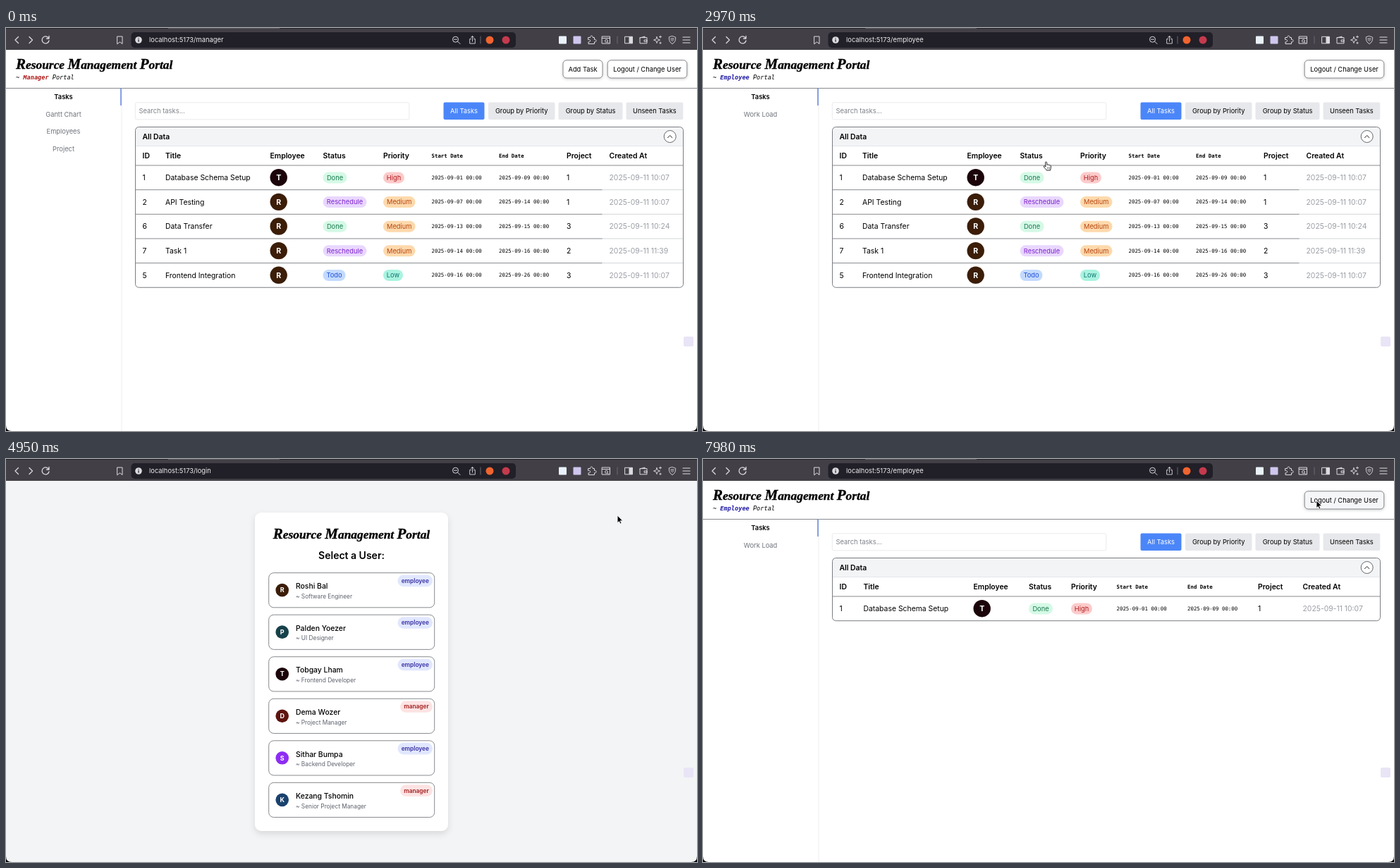
An HTML page for the animation above (8000 ms loop, 980x572 px).

```html
<!DOCTYPE html>
<html lang="en">
<head>
<meta charset="utf-8">
<title>Resource Management Portal</title>
<style>
  html, body { margin: 0; width: 100%; height: 100%; overflow: hidden; background: #fff; }
  svg { display: block; }
  text { font-family: Inter, sans-serif; white-space: pre; }
  .mono { font-family: "DejaVu Sans Mono", monospace; }
  .brand { font-family: "Liberation Serif", serif; font-weight: 700; font-style: italic; stroke: #000; stroke-width: .35; }
  .raised { filter: drop-shadow(0 1px 2px #0003); }
  .panel { filter: drop-shadow(0 4px 5px #0000001c); }
</style>
</head>
<body>
<svg id="stage" width="980" height="572" viewBox="0 0 980 572"></svg>
<script>
const LOOP = 8000;
const LINE = '#7b7d82';

// Drawing helpers: text is placed by its vertical centre.
const text = (x, y, s, size = 9.3, attrs = '') =>
  `<text x="${x}" y="${y + size * .36}" font-size="${size}" ${attrs}>${s}</text>`;
const rect = (x, y, w, h, fill, attrs = '') =>
  `<rect x="${x}" y="${y}" width="${w}" height="${h}" fill="${fill}" ${attrs}/>`;
const circle = (x, y, r, fill, attrs = '') =>
  `<circle cx="${x}" cy="${y}" r="${r}" fill="${fill}" ${attrs}/>`;
const stroke = (d, colour, width = 1) =>
  `<path d="${d}" fill="none" stroke="${colour}" stroke-width="${width}" stroke-linecap="round" stroke-linejoin="round"/>`;
const MIDDLE = 'text-anchor="middle"';
const BOLD = 'font-weight="600"';

const avatarColours = { R: '#3b1d08', P: '#17414a', T: '#1b050a', D: '#5e130e', S: '#8d2df3', K: '#1a426e' };
const avatar = (x, y, r, letter) => circle(x, y, r, avatarColours[letter]) +
  text(x, y, letter, r > 10 ? 10.6 : 9, `${MIDDLE} font-weight="700" fill="#fff"`);

const brand = (x, y, attrs = '') => {
  const words = 'Resource Management Portal'.replace(/[A-Z]/g, c => `<tspan font-size="21">${c}</tspan>`);
  return text(x, y, words, 17.4, `class="brand" ${attrs}`);
};

const pills = {
  Done: [34, '#d5f9e6', '#18794e'], Reschedule: [62, '#e9d7fe', '#7e22ce'], Todo: [32, '#c3dafe', '#1d4ed8'],
  High: [30, '#fccbcb', '#b01c1c'], Medium: [45.5, '#fdd9ac', '#b8440f'], Low: [28, '#a9f3e0', '#0f766e']
};
const pill = (x, y, label) => {
  const [w, back, ink] = pills[label];
  return rect(x, y - 8, w, 16, back, 'rx="8"') + text(x + w / 2, y, label, 9.3, `${MIDDLE} fill="${ink}"`);
};

const tasks = [
  [1, 'Database Schema Setup', 'T', 'Done', 'High', '01', '09', 1, '10:07'],
  [2, 'API Testing', 'R', 'Reschedule', 'Medium', '07', '14', 1, '10:07'],
  [6, 'Data Transfer', 'R', 'Done', 'Medium', '13', '15', 3, '10:24'],
  [7, 'Task 1', 'R', 'Reschedule', 'Medium', '14', '16', 2, '11:39'],
  [5, 'Frontend Integration', 'R', 'Todo', 'Low', '16', '26', 3, '10:07']
];
const heads = ['ID', 'Title', 'Employee', 'Status', 'Priority', 'Start Date', 'End Date', 'Project', 'Created At'];
const columns = {
  all: [193.5, 226, 374.5, 449.5, 535, 603.5, 699, 795, 855.5],
  R: [193.5, 227, 357, 434, 522, 593, 691, 790, 852],
  T: [193.5, 227.5, 383.5, 462, 522, 586.5, 687, 787, 850.5]
};

function table(owner) {
  const cols = columns[owner];
  const rows = tasks.filter(task => owner === 'all' || task[2] === owner);
  const pitch = 34.65, bottom = 195 + rows.length * pitch;
  let out = rect(183.5, 140.5, 777, 27, '#f3f4f6', 'rx="5"') + rect(184, 160, 776, 7, '#f3f4f6') +
    stroke('M184 167.5H960', '#dfe1e5', .8) +
    text(193.5, 154, 'All Data', 10.4, BOLD) +
    circle(941.7, 154, 8.5, '#fff', 'stroke="#55585d" stroke-width=".9"') + stroke('M938.5 155.7l3.2-3.2 3.2 3.2', '#222');
  heads.forEach((head, i) => {
    const small = i === 5 || i === 6;
    out += text(cols[i], 181.3, head, small ? 7.4 : 10.4, small ? 'class="mono" font-weight="700"' : BOLD);
  });
  out += stroke('M184 195H960', LINE, .9);
  rows.forEach(([id, title, letter, status, priority, start, end, project, time], i) => {
    const y = 212.4 + i * pitch;
    const date = (col, day) => text(col, y - .4, `2025-09-${day} 00:00`, 7.4, 'class="mono"');
    out += text(cols[0], y, id, 10.4) + text(cols[1], y, title, 10.4) + avatar(cols[2] + 12.2, y - .2, 12.2, letter) +
      pill(cols[3], y, status) + pill(cols[4], y, priority) + date(cols[5], start) + date(cols[6], end) +
      text(cols[7], y, project, 10.4) + text(cols[8], y, `2025-09-11 ${time}`, 10.4, 'fill="#9b9ea5"');
    if (i < rows.length - 1) {
      const line = 195 + (i + 1) * pitch, split = cols[8] - 10;
      out += stroke(`M184 ${line}H${split}`, LINE, .9) + stroke(`M${split} ${line}H960`, '#cfd1d4', .9);
    }
  });
  return out + rect(183.5, 140.5, 777, bottom - 140.5, 'none', `rx="5" stroke="${LINE}"`);
}

const url = path => text(203, 17, `localhost:5173/${path}`, 9.4, 'fill="#ededf0"');
const button = (x, w, label, name) =>
  rect(x, 45.8, w, 25.2, '#fff', `rx="5" class="raised ${name}" stroke="${LINE}" stroke-width=".9"`) +
  text(x + w / 2, 58.4, label, 9.3, MIDDLE);

function portal(role, owner) {
  const manager = role === 'Manager';
  const links = manager ? ['Tasks', 'Gantt Chart', 'Employees', 'Project'] : ['Tasks', 'Work Load'];
  const filters = [[620.5, 58, 'All Tasks'], [684, 94.5, 'Group by Priority'], [783.5, 91, 'Group by Status'], [879.5, 80.8, 'Unseen Tasks']];
  const roleText = `~ <tspan font-weight="700" fill="${manager ? '#b01919' : '#211ba6'}">${role}</tspan> Portal`;
  return url(role.toLowerCase()) + brand(14, 51.5) +
    text(14, 70.3, roleText, 8.6, 'class="mono" font-style="italic"') +
    (manager ? button(790, 56, 'Add Task', '') : '') + button(853.2, 112.6, 'Logout / Change User', 'logout') +
    stroke('M0 85.5H980', LINE, .9) + stroke('M164 86V572', '#efeff1') + stroke('M163 86V109.5', '#4a6fd8', 1.3) +
    links.map((link, i) => text(81.5, 98 + i * 24.5, link, 9.3, MIDDLE + (i ? ' fill="#6f737b"' : ` ${BOLD}`))).join('') +
    rect(183.3, 105.8, 388.5, 24, '#fff', 'rx="2" stroke="#e8e9ec" stroke-width=".9"') +
    text(188.5, 118, 'Search tasks...', 9.4, 'fill="#7d8088"') +
    filters.map(([x, w, label], i) => rect(x, 105.5, w, 24.4, i ? '#e7e8eb' : '#4b86f9', 'rx="2"') +
      text(x + w / 2, 118, label, 9.3, MIDDLE + (i ? '' : ' fill="#fff"'))).join('') +
    table(owner);
}

const users = [
  ['Roshi Bal', 'Software Engineer'], ['Palden Yoezer', 'UI Designer'], ['Tobgay Lham', 'Frontend Developer'],
  ['Dema Wozer', 'Project Manager', 1], ['Sithar Bumpa', 'Backend Developer'], ['Kezang Tshomin', 'Senior Project Manager', 1]
];
const cardTop = i => 161.6 + i * 59.55;

function login() {
  return url('login') + rect(0, 31, 980, 541, '#f3f4f6') +
    rect(353, 76, 274, 452, '#fff', 'rx="9" class="panel"') +
    brand(490, 106.5, MIDDLE) + text(490, 137, 'Select a User:', 14, `${MIDDLE} ${BOLD}`) +
    users.map(([name, job, lead], i) => {
      const y = cardTop(i), w = lead ? 46 : 49.5;
      return rect(372.7, y, 235, 49.2, '#fff', `rx="7" class="card" stroke="${LINE}" stroke-width=".9"`) +
        avatar(391.7, y + 24.5, 9.3, name[0]) +
        text(411, y + 19, name, 10.4, 'font-weight="500"') + text(411, y + 33.3, `~ ${job}`, 8.3, 'fill="#5d626c"') +
        rect(605 - w, y + 3, w, 16.6, lead ? '#fde3e3' : '#e1e7fe', 'rx="8.3"') +
        text(605 - w / 2, y + 11.2, lead ? 'manager' : 'employee', 8.3, `${MIDDLE} ${BOLD} fill="${lead ? '#a01d1d' : '#3730a3'}"`);
    }).join('');
}

function browserBar() {
  const ink = '#dcdbe0';
  return rect(0, 0, 980, 31, '#424046') + rect(0, 0, 980, 1, '#232228') + rect(230, 0, 158, 1, '#5a585f') +
    rect(177.5, 6, 545.5, 22, '#211f27', 'rx="5"') +
    stroke('M17.5 12.5L13 17l4.5 4.5M33 12.5l4.5 4.5-4.5 4.5', ink, 1.3) +
    stroke('M60.5 14.5A5 5 0 1 0 61 18M61 11.5v3.5h-3.5', ink, 1.3) +
    stroke('M158 12h7v10.5l-3.5-2.7-3.5 2.7z', ink) +
    circle(188, 17, 4.8, ink) + stroke('M188 16.6v2.6M188 14.6v.1', '#211f27', 1.2) +
    stroke('M641 19.5l3 3M635.5 16.2h4', ink) + circle(637.5, 16.2, 4, 'none', `stroke="${ink}"`) +
    stroke('M659.5 15.5h-1.8v6.5h7.6v-6.5h-1.8M661.5 19v-7.5M659.3 13.5l2.2-2 2.2 2', ink, .9) +
    stroke('M673 12V22M867 12V22', '#6b6972') +
    circle(686, 17, 5.5, '#f0642f') + circle(709, 17, 5.5, '#c43a4d') +
    rect(784, 11.5, 11, 11, '#e9f2fb', 'rx="1"') + rect(804.5, 11.5, 11, 11, '#cfc6ee', 'rx="1"') +
    stroke('M826 13.5h2.7a1.8 1.8 0 1 1 3.4 0h2.4v3a1.8 1.8 0 1 1 0 3.2v2.8h-8.5v-2.8a1.8 1.8 0 1 0 0-3.2z', ink) +
    stroke('M845.5 12h11v10h-11zM845.5 14.5h11M853 19.8l1.5 1.4', ink) + circle(851.5, 18.3, 1.9, 'none', `stroke="${ink}"`) +
    stroke('M878 12.3h10.5v9.5H878z', ink) + rect(883.5, 12.3, 5, 9.5, ink) +
    stroke('M899 14v7.8h10V14zl7-2v2M905.5 17h3.5v2.3h-3.5z', ink) +
    stroke('M923 12.5l1.2 3.3 3.3 1.2-3.3 1.2-1.2 3.3-1.2-3.3-3.3-1.2 3.3-1.2zM928 11v3M926.5 12.5h3M928 20v2.5M926.8 21.2h2.4', ink, .9) +
    stroke('M945 11.5l4.7 1.7c.3 4.5-1.3 7.5-4.7 9.5-3.4-2-5-5-4.7-9.5zM942.5 15.5q2.5-1.8 5 0M943.5 17.3q1.5-1 3 0M945 19.3v.1', ink, .9) +
    stroke('M960 13h10M960 17h10M960 21h10', ink, 1.2);
}

const arrow = '<path id="arrow" d="M0 0V10.6L2.4 8.4 4.1 12 5.9 11.2 4.2 7.7H7.6Z" fill="#000" stroke="#fff" stroke-width=".8"/>';
const hand = `<g id="hand">${rect(-10, -6, 22, 23, '#fff', 'id="patch"')}
  <path d="M-1.5 1.1C-1.5-.3 .5-.3 .6 1L1 4.4C1.4 3.6 2.6 3.7 2.8 4.6 3.4 3.8 4.5 4.2 4.6 5.1 5.4 4.5 6.4 5.1 6.4 6.1V8.3C6.4 9.6 5.8 10.2 5.6 12H.2C-.4 10.3-3 8.4-3.7 6.9-4.1 5.8-2.8 5.3-2 6.2L-1 7.1Z"
    fill="#fff" stroke="#111" stroke-width=".9" stroke-linejoin="round"/>${stroke('M1.6 7.6v2.4M3.1 7.6v2.4M4.6 7.6v2.4', '#333', .5)}</g>`;

const scenes = {
  manager: portal('Manager', 'all'), login: login(),
  employee: portal('Employee', 'all'), first: portal('Employee', 'R'), second: portal('Employee', 'T')
};
const stage = document.getElementById('stage');
stage.innerHTML = browserBar() +
  Object.entries(scenes).map(([id, body]) => `<g id="${id}">${body}</g>`).join('') +
  rect(961, 438, 14, 14, '#e9e4f6', 'rx="2"') +
  '<path d="M0 564Q0 572 8 572H0ZM980 564Q980 572 972 572H980Z"/>' +
  `<g id="cursor">${arrow}${hand}</g>`;

const schedule = [[0, 'manager'], [1440, 'login'], [2940, 'employee'], [3090, 'first'], [4590, 'login'], [6030, 'employee'], [6180, 'second']];
// Cursor waypoints: time, x, y
const route = [
  [0, 770, -20], [60, 770, -20], [210, 800, 24], [360, 800, 24], [810, 905, 60], [1620, 905, 60],
  [2220, 609, 219.5], [2340, 592, 217], [2430, 592, 217], [2790, 487, 190], [3210, 487, 190],
  [3550, 560, 270], [4020, 845, 76], [4200, 897, 47.5], [4350, 900, 54], [4860, 900, 54],
  [5310, 590, 300], [5460, 590, 300], [5910, 534, 310], [6720, 534, 310],
  [6960, 643, 244.5], [7500, 770, 160], [7980, 870, 59], [8000, 870, 59]
];

// Slope at a waypoint; zero next to a rest so the cursor eases in and out.
function slope(i, axis) {
  const a = route[i - 1], b = route[i], c = route[i + 1];
  if (!a || !c || a[1] === b[1] || b[1] === c[1]) return 0;
  return (c[axis] - a[axis]) / (c[0] - a[0]);
}
function cursorAt(t) {
  const i = route.findIndex(p => p[0] > t) - 1;
  const a = route[i], b = route[i + 1], span = b[0] - a[0], u = (t - a[0]) / span, v = 1 - u;
  return [1, 2].map(axis =>
    v * v * (1 + 2 * u) * a[axis] + u * u * (3 - 2 * u) * b[axis] +
    span * u * v * (v * slope(i, axis) - u * slope(i + 1, axis)));
}

const byId = id => document.getElementById(id);
const show = (id, on) => byId(id).style.display = on ? '' : 'none';
const cards = [...stage.querySelectorAll('.card')];
const logouts = [...stage.querySelectorAll('.logout')];

function draw(now) {
  const t = now % LOOP;
  const scene = schedule.findLast(([start]) => start <= t)[1];
  const onLogin = scene === 'login';
  const [x, y] = cursorAt(t);
  Object.keys(scenes).forEach(id => show(id, id === scene));

  let overCard = false;
  cards.forEach((card, i) => {
    const over = x > 372 && x < 608 && y > cardTop(i) && y < cardTop(i) + 49.2;
    card.setAttribute('fill', over ? '#f3f4f6' : '#fff');
    overCard ||= over;
  });
  const overLogout = x > 853 && x < 966 && y > 45.5 && y < 71;
  logouts.forEach(el => el.setAttribute('fill', overLogout ? '#f5f6f7' : '#fff'));

  // After a click the pointer keeps its hand until it moves again.
  const pointing = onLogin ? overCard : (t > 2900 && t < 3210) || (t > 6000 && t < 6720);
  show('arrow', !pointing);
  show('hand', pointing);
  show('patch', onLogin);
  byId('cursor').setAttribute('transform', `translate(${x} ${y})`);
  requestAnimationFrame(draw);
}
requestAnimationFrame(draw);
</script>
</body>
</html>
```
